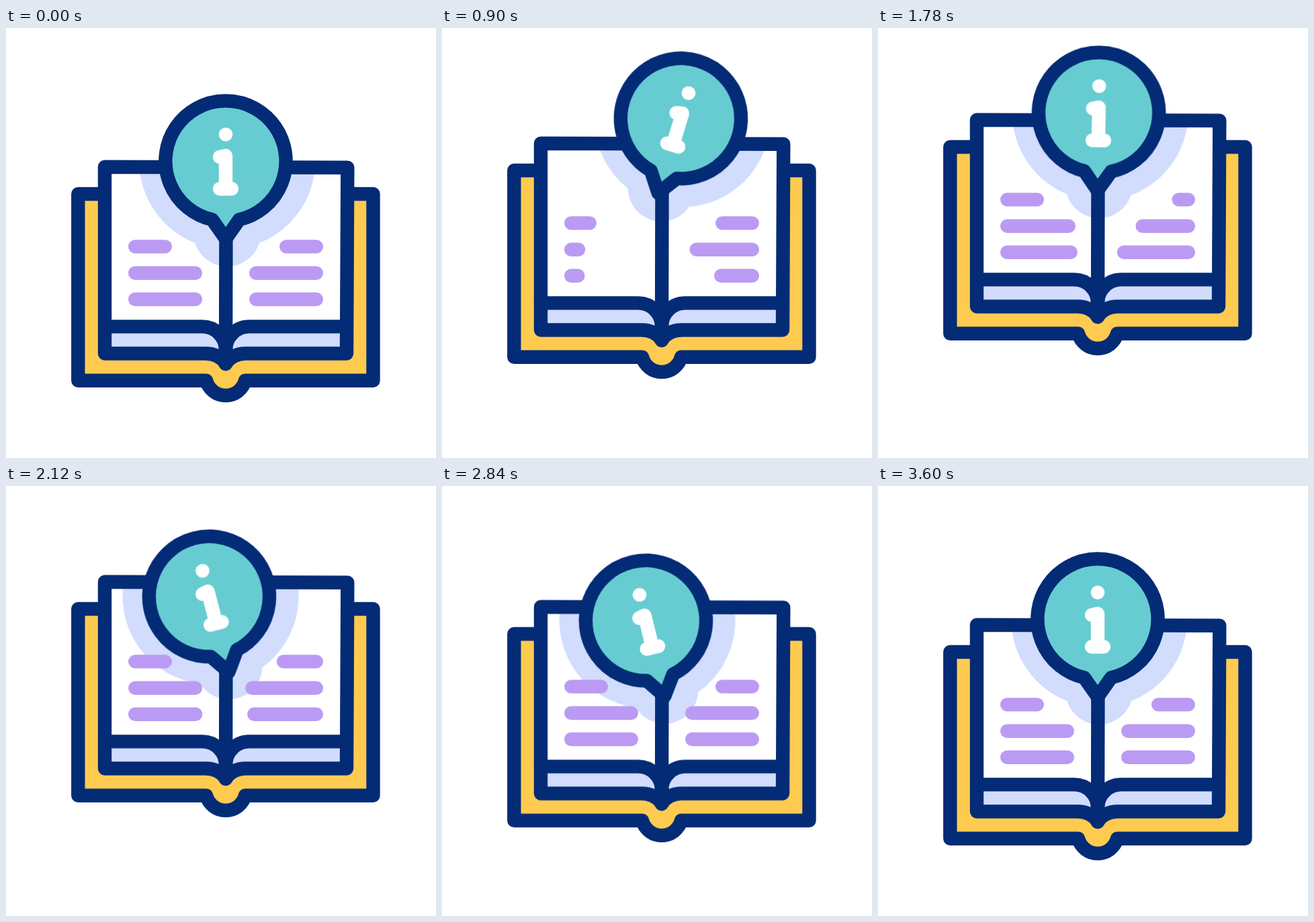
Write an HTML page without scripts that moves like this. It is 640 by 640 pixels and loops after 3620 ms.

```html
<!DOCTYPE html>
<html lang="en">
<head>
<meta charset="utf-8">
<title>Open book with info bubble</title>
<style>
  html, body { margin: 0; width: 100%; height: 100%; overflow: hidden; background: #fff; }
  svg { display: block; width: 100vw; height: 100vh; }

  .outline { stroke: #042b76; stroke-width: 20.4; stroke-linecap: round; stroke-linejoin: round; }
  .glyph { stroke: #fff; stroke-width: 20.4; stroke-linecap: round; stroke-linejoin: round; }
  .bars { fill: #bb9af3; }
  .bars rect { x: 182px; width: var(--w); height: 20.4px; rx: 10.2px; --w: 110px; }
  .bars .short { --w: 65px; }

  .book, .bubble, .bars rect {
    animation: 3620ms cubic-bezier(.333, 0, .667, 1) infinite;
  }
  .book { animation-name: float; }
  .bubble { animation-name: sway; transform-origin: 327px 296px; }
  .bars rect { animation-name: rewrite; animation-delay: var(--delay, 0s); }

  @keyframes float {
    0%, 99.448%, 100% { transform: translateY(0); }
    49.724% { transform: translateY(-70px); }
  }
  @keyframes sway {
    0%, 99.448%, 100% { transform: translateY(0) rotate(0deg); }
    33.149% { transform: translateY(-38.4px) rotate(20deg); }
    66.298% { transform: translateY(38px) rotate(-20deg); }
  }
  /* shrink to a dot, overshoot, settle: 600 ms each */
  @keyframes rewrite {
    0%, 49.724%, 100% { width: var(--w); }
    16.575% { width: 24.3px; }
    33.149% { width: calc(var(--w) + 6.4px); }
  }
</style>
</head>
<body>
<svg viewBox="0 0 640 640" fill="none">
  <defs>
    <clipPath id="pages"><rect x="147" y="207" width="361" height="237"/></clipPath>
  </defs>

  <g class="book">
    <path class="outline" fill="#fecb50" d="M147 247H107.3V524.7H298A30 30 0 0 0 356 524.7H546.5V247H508"/>

    <path fill="#d2dcfd" d="M147 207H508L507 484.5H357C342 484.5 333 490 327 500C321 490 312 484.5 297 484.5H147Z"/>
    <path fill="#fff" d="M147 207H508L507 444.4H362A35 35 0 0 0 327 479A35 35 0 0 0 292 444.4H147Z"/>

    <g clip-path="url(#pages)">
      <g class="bubble" fill="#d2dcfd">
        <circle cx="329.2" cy="198" r="131"/>
        <circle cx="329.2" cy="305" r="50"/>
      </g>
    </g>

    <g class="bars">
      <rect class="short" y="315.2"/>
      <rect y="354.5" style="--delay: .2s"/>
      <rect y="393.5" style="--delay: .4s"/>
      <g transform="translate(654) scale(-1 1)">
        <rect class="short" y="315.2" style="--delay: 1s"/>
        <rect y="354.5" style="--delay: .8s"/>
        <rect y="393.5" style="--delay: .6s"/>
      </g>
    </g>

    <g class="outline">
      <path d="M147 206.7L508.3 207.8L507 484.5H357C342 484.5 333 490 327 500C321 490 312 484.5 297 484.5H147Z"/>
      <path d="M147 444.4H292A35 35 0 0 1 327 479A35 35 0 0 1 362 444.4H507"/>
      <path d="M327.5 280L327 500"/>
    </g>

    <g class="bubble">
      <path class="outline" fill="#67ccd1" d="M307 285.3A89.6 89.6 0 1 1 347 285.3L327 314Z"/>
      <circle cx="327" cy="158.5" r="10.3" fill="#fff"/>
      <path class="glyph" d="M318 192L327 190V239.3M318 239.3H336"/>
    </g>
  </g>
</svg>
</body>
</html>
```
